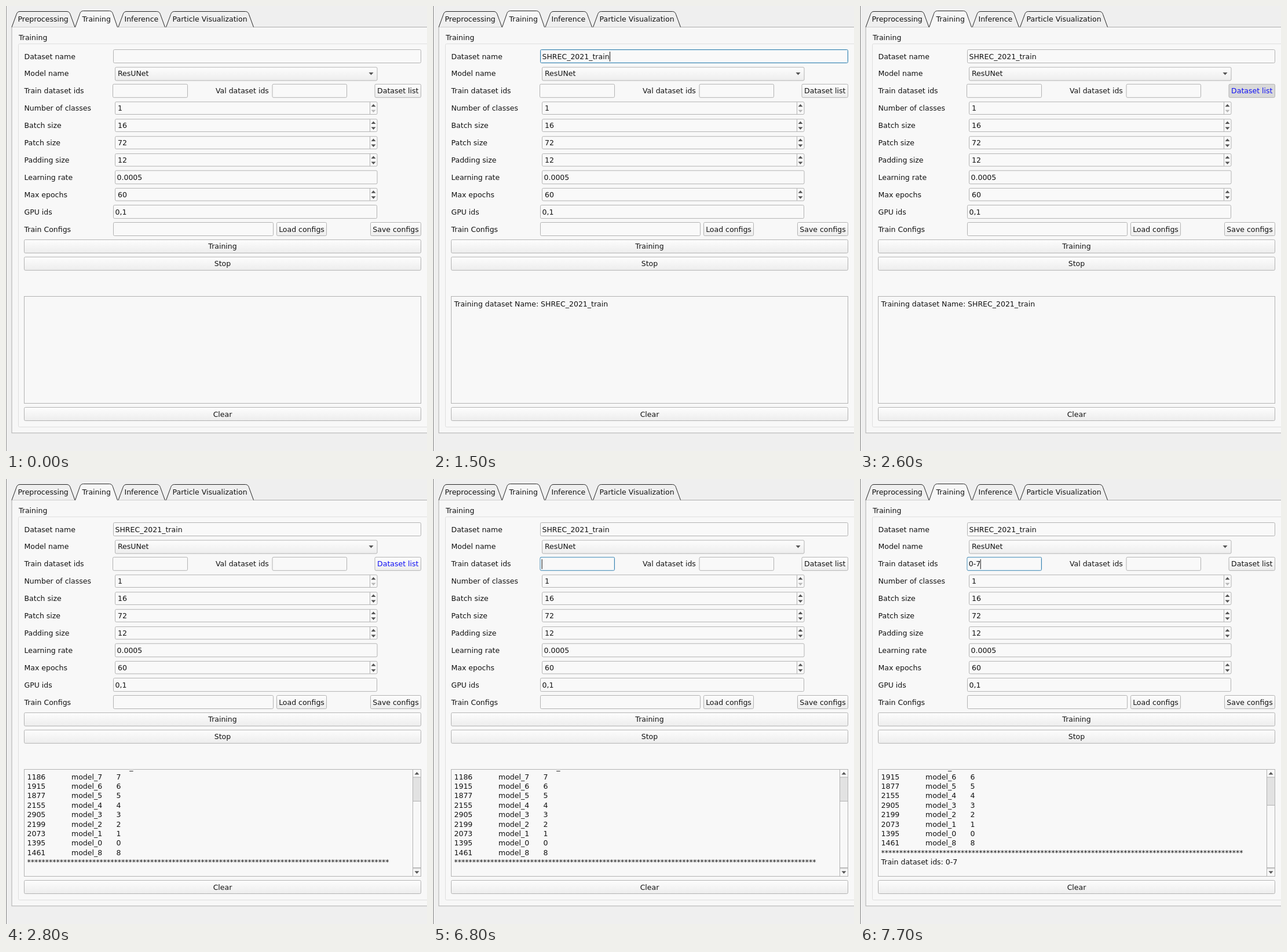
Write an HTML page that moves like this. It is 727 px wide and 770 px high and loops after 8000 ms.

```html
<!DOCTYPE html>
<html lang="en">
<head>
<meta charset="utf-8">
<title>Training form</title>
<style>
html, body { margin: 0; width: 100%; height: 100%; overflow: hidden; background: #efefef; }
svg { display: block; }
text { font: 12.5px "DejaVu Sans", sans-serif; fill: #111; white-space: pre; }
</style>
</head>
<body>
<svg width="727" height="770" viewBox="0 0 727 770">
  <defs>
    <linearGradient id="face" x2="0" y2="1">
      <stop stop-color="#fdfdfd"/><stop offset="1" stop-color="#ededed"/>
    </linearGradient>
    <clipPath id="view"><rect x="32" y="503.2" width="684" height="184"/></clipPath>
  </defs>
  <g id="base"></g>
  <g id="live"></g>
</svg>
<script>
const LOOP = 8000, EDGE = '#b2b2b2', FIELD = '#f9f9f9';
const NAME = 'SHREC_2021_train';
const rowY = i => 87 + 29.9 * i;

const text = (x, cy, s, extra = '') => `<text x="${x}" y="${cy + 4.5}" ${extra}>${s}</text>`;
const rect = (x0, y0, x1, y1, fill, stroke = EDGE, r = 2) =>
  `<rect x="${x0}" y="${y0}" width="${x1 - x0}" height="${y1 - y0}" rx="${r}" fill="${fill}" stroke="${stroke}"/>`;
const path = (d, stroke, fill = 'none') => `<path d="${d}" stroke="${stroke}" fill="${fill}"/>`;
const arrow = (x, y, dir, color = '#555') =>
  path(`M${x - 4},${y - 2 * dir}h8l-4,${4.5 * dir}z`, 'none', color);

const field = (x0, x1, cy, s = '', dx = 3) =>
  rect(x0, cy - 11.5, x1, cy + 11.5, FIELD) + text(x0 + dx, cy, s);
const focus = (x0, x1, cy) =>
  rect(x0, cy - 11.5, x1, cy + 11.5, FIELD, '#3580ad') +
  rect(x0 + 1, cy - 10.5, x1 - 1, cy + 10.5, 'none', '#d5e8f3', 1);
const caret = (x, cy) => path(`M${x},${cy - 8}v17`, '#111');
const button = (x0, x1, cy, s, fill = 'url(#face)', color = '#111') =>
  rect(x0, cy - 11.5, x1, cy + 11.5, fill) +
  text((x0 + x1) / 2, cy, s, `text-anchor="middle" style="fill:${color}"`);

function spin(cy, value) {
  return rect(188.5, cy - 10.8, 641, cy + 10.8, FIELD) + text(193, cy, value) +
    path(`M628.5,${cy - 10.5}v21`, EDGE) +
    arrow(634.5, cy - 4.5, -1) + arrow(634.5, cy + 5, 1, value === '1' ? '#b8b8b8' : '#555');
}

function tab(x0, x1, label, tx, top = 9.5, fill = '#efefef') {
  return path(`M${x0},36.5L${x0 + 8},${top + 5}Q${x0 + 9.5},${top} ${x0 + 14},${top}` +
    `H${x1 - 14}Q${x1 - 9.5},${top} ${x1 - 8},${top + 5}L${x1},36.5`, '#262626', fill) +
    text(tx, 22.5, label);
}

function form() {
  const labels = ['Dataset name', 'Model name', 'Train dataset ids', 'Number of classes',
    'Batch size', 'Patch size', 'Padding size', 'Learning rate', 'Max epochs', 'GPU ids', 'Train Configs'];
  return rect(10, 36.5, 740, 738.8, '#f7f7f7', '#adadad', 0) +
    tab(10, 119, 'Preprocessing', 20.5) +
    tab(194, 274.5, 'Inference', 204.5) +
    tab(276.5, 427.5, 'Particle Visualization', 287.5) +
    tab(119.5, 192.5, 'Training', 131.5, 8.5, '#f7f7f7') +
    path('M120.5,36.5H191.5', '#f7f7f7') +
    text(22, 54.5, 'Training') +
    rect(21.5, 65.5, 740, 728.5, '#f8f8f8', '#dedede') +
    labels.map((s, i) => text(31.5, rowY(i), s)).join('') +
    rect(188.5, 106, 641, 129, 'url(#face)') + text(193, rowY(1), 'ResUNet') + arrow(630.5, 117, 1) +
    text(362, rowY(2), 'Val dataset ids') + field(460, 588.5, rowY(2)) +
    [[3, '1'], [4, '16'], [5, '72'], [6, '12'], [8, '60']].map(([i, v]) => spin(rowY(i), v)).join('') +
    field(188.5, 641, rowY(7), '0.0005') +
    field(185.5, 640.5, rowY(9), '0,1') +
    field(185.5, 461.5, rowY(10)) +
    button(467.5, 553.5, rowY(10), 'Load configs') +
    button(629.5, 716.5, rowY(10), 'Save configs') +
    button(31.5, 716.5, rowY(11), 'Training') +
    button(31.5, 716.5, rowY(12), 'Stop') +
    rect(31.5, 502.5, 716.5, 687.5, '#f8f8f8', EDGE, 0) +
    button(31.5, 716.5, 706, 'Clear');
}

const ids = ['1186', '1915', '1877', '2155', '2905', '2199', '2073', '1395', '1461'];
const models = [7, 6, 5, 4, 3, 2, 1, 0, 8];

function datasetLog(done) {
  const lineY = i => 515 + 16.4 * (i - done);
  const rows = ids.map((id, i) => text(36.5, lineY(i), id) +
    text(113, lineY(i), 'model_' + models[i]) + text(190.5, lineY(i), models[i])).join('');
  const split = done ? 564.5 : 557.5;
  return `<g clip-path="url(#view)">` + text(213.2, lineY(-1), '_') + rows +
    text(36.5, lineY(9), '*'.repeat(100)) +
    (done ? text(36.5, lineY(10), 'Train dataset ids: 0-7') : '') + '</g>' +
    rect(702.5, 502.5, 716.5, 687.5, '#f8f8f8', EDGE, 0) +
    rect(702.5, 516, 716.5, split, '#e2e2e2', EDGE, 0) +
    path('M702.5,672.5h14m-14,1.5h14', EDGE) +
    arrow(709.5, 509.5, -1) + arrow(709.5, 680.5, 1);
}

function scene(t) {
  const within = (a, b) => t >= a && t < b;
  const nameY = rowY(0), idsY = rowY(2);
  const named = t >= 1500, done = t >= 7700;
  let out = path('M.5,0V770', within(700, 4000) || t >= 6800 ? '#858585' : '#959595');

  out += within(700, 2500) ? focus(185.5, 716.5, nameY) : field(185.5, 716.5, nameY);
  if (named) out += text(188.5, nameY, NAME);
  if (within(700, 1100)) out += caret(189, nameY);
  if (within(1500, 2100)) out += caret(305.5, nameY);

  out += t >= 6800 ? focus(185, 313.5, idsY) : field(184.5, 313.5, idsY);
  if (done) out += text(187.8, idsY, '0-7') + caret(208.2, idsY);
  if (within(6800, 7300)) out += caret(188.2, idsY);

  out += button(637, 716.5, idsY, 'Dataset list',
    within(2600, 2800) ? '#d9d9d9' : 'url(#face)', within(2400, 3100) ? '#1010f5' : '#111');

  if (t >= 2800) out += datasetLog(done);
  else if (named) out += text(36.5, 515, 'Training dataset Name: ' + NAME);
  return out;
}

const base = document.getElementById('base'), live = document.getElementById('live');
base.innerHTML = form();
let shown = '';
function draw() {
  const next = scene(performance.now() % LOOP);
  if (next !== shown) live.innerHTML = shown = next;
  requestAnimationFrame(draw);
}
draw();
</script>
</body>
</html>
```
